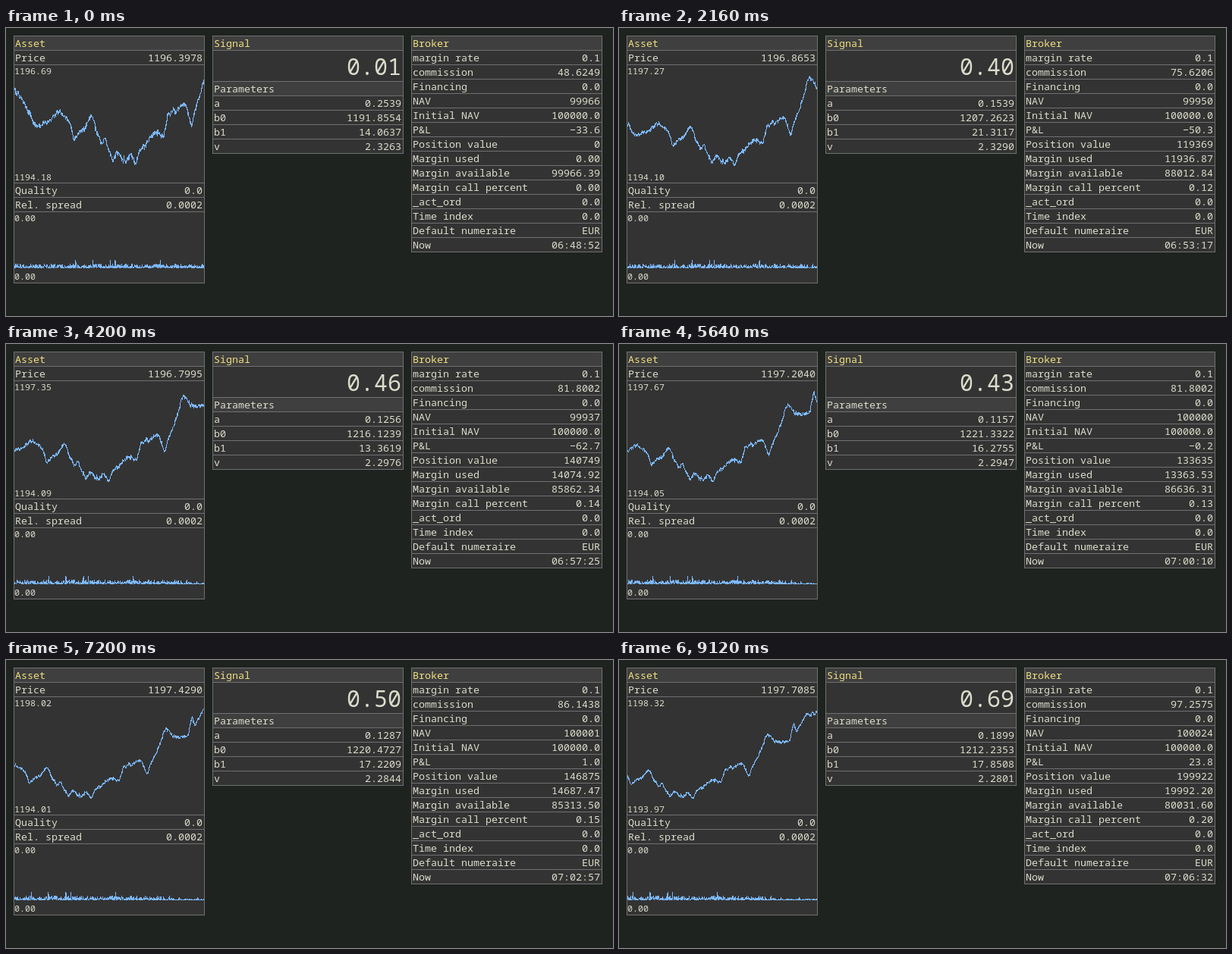
Write an HTML page that moves like this. It is 800x380 px and loops after 9.24 s.

```html
<!DOCTYPE html>
<html lang="en">
<head>
<meta charset="utf-8">
<title>Trading monitor</title>
<style>
  html, body { margin: 0; width: 100%; height: 100%; overflow: hidden; background: #1e2320; }
  svg { display: block; width: 800px; height: 380px; }
  text { font: 13.333px "Noto Sans Mono", "DejaVu Sans Mono", monospace; fill: #dcdccc; }
  .title { fill: #f0df80; }
  .right { text-anchor: end; }
  .small { font-size: 11.667px; }
  .big { font-size: 30px; }
  .panel { fill: #333; }
  .bar { fill: #3f3f3f; }
  .frame { fill: none; stroke: #707070; }
  .curve { fill: none; stroke: #7cb8ff; shape-rendering: crispEdges; stroke-linejoin: bevel; }
</style>
</head>
<body>
<svg id="stage" viewBox="0 0 800 380"></svg>
<script>
const LOOP = 9240, STEP = 120, ROW = 19, TOP = 10, WIDTH = 252;
const stage = document.getElementById('stage');

function add(tag, attrs, content) {
  const el = document.createElementNS('http://www.w3.org/2000/svg', tag);
  for (const name in attrs) el.setAttribute(name, attrs[name]);
  if (content !== undefined) el.textContent = content;
  return stage.appendChild(el);
}

// Panels are stacks of rows: [label, value or $field, height, kind]
const fields = {};
function panel(x, rows) {
  const height = rows.reduce((sum, r) => sum + (r[2] || ROW), 0);
  add('rect', { x, y: TOP, width: WIDTH, height, class: 'panel' });
  let y = TOP, lines = '';
  for (const [label, value, h = ROW, kind = ''] of rows) {
    if (kind === 'title' || kind === 'head')
      add('rect', { x, y, width: WIDTH, height: h, class: 'bar' });
    if (label) add('text', { x: x + 2, y: y + 15, class: kind }, label);
    if (value !== undefined) {
      const baseline = kind === 'big' ? 33 : 15;
      const el = add('text', { x: x + 249, y: y + baseline, class: 'right ' + kind }, value);
      if (value[0] === '$') fields[value.slice(1)] = el;
    }
    y += h;
    if (y < TOP + height) lines += `M${x} ${y + 0.5}h${WIDTH}`;
  }
  add('path', { d: lines, class: 'frame' });
  add('rect', { x: x + 0.5, y: TOP + 0.5, width: WIDTH - 1, height, class: 'frame' });
}

panel(10, [
  ['Asset', undefined, ROW, 'title'],
  ['Price', '$price'],
  ['', undefined, 156],
  ['Quality', '0.0'],
  ['Rel. spread', '0.0002'],
  ['', undefined, 94]
]);
panel(272, [
  ['Signal', undefined, ROW, 'title'],
  ['', '$signal', 41, 'big'],
  ['Parameters', undefined, ROW, 'head'],
  ['a', '$a'], ['b0', '$b0'], ['b1', '$b1'], ['v', '$v']
]);
panel(534, [
  ['Broker', undefined, ROW, 'title'],
  ['margin rate', '0.1'],
  ['commission', '$commission'],
  ['Financing', '0.0'],
  ['NAV', '$nav'],
  ['Initial NAV', '100000.0'],
  ['P&L', '$profit'],
  ['Position value', '$position'],
  ['Margin used', '$used'],
  ['Margin available', '$free'],
  ['Margin call percent', '$call'],
  ['_act_ord', '0.0'],
  ['Time index', '0.0'],
  ['Default numeraire', 'EUR'],
  ['Now', '$now']
]);

const priceCurve = add('path', { class: 'curve' });
const spreadCurve = add('path', { class: 'curve' });
const small = y => add('text', { x: 11, y, class: 'small' }, '0.00');
fields.high = small(61);
fields.low = small(201);
small(255);
small(332);

function noise(n) {
  const s = Math.sin(n * 12.9898 + 4.1) * 43758.5453;
  return s - Math.floor(s);
}

// Linear interpolation of ys over the rising positions xs
function lerp(xs, ys, x) {
  let i = 0;
  while (i < xs.length - 2 && x >= xs[i + 1]) i++;
  return ys[i] + (ys[i + 1] - ys[i]) * (x - xs[i]) / (xs[i + 1] - xs[i]);
}

// Readings at a few ticks; every other value follows from these
const OPEN = 24532;
const ticks = [0, 7, 18, 35, 47, 60, 76];
const readings = {
  elapsed: [0, 108, 265, 513, 678, 845, 1060],
  price: [1196.3978, 1196.9505, 1196.8653, 1196.7995, 1197.2040, 1197.4290, 1197.7085],
  high: [1196.69, 1197.01, 1197.27, 1197.35, 1197.67, 1198.02, 1198.32],
  signal: [0.01, 0.01, 0.40, 0.46, 0.43, 0.50, 0.69],
  a: [0.2539, 0.3117, 0.1539, 0.1256, 0.1157, 0.1287, 0.1899],
  b0: [1191.8554, 1187.4893, 1207.2623, 1216.1239, 1221.3322, 1220.4727, 1212.2353],
  b1: [14.0637, 15.2328, 21.3117, 13.3619, 16.2755, 17.2209, 17.8508],
  v: [2.3263, 2.3336, 2.3290, 2.2976, 2.2947, 2.2844, 2.2801],
  commission: [48.6249, 49.5572, 75.6206, 81.8002, 81.8002, 86.1438, 97.2575],
  profit: [-33.61, -33.32, -50.29, -62.74, -0.16, 0.97, 23.80],
  used: [0, 306.04, 11936.87, 14074.92, 13363.53, 14687.47, 19992.20]
};

function readAt(tick) {
  const r = {};
  for (const name in readings) r[name] = lerp(ticks, readings[name], tick);
  r.low = 1194.178 - 0.129 * (r.high - 1196.69);
  r.nav = 100000 + r.profit;
  r.position = r.used * 10;
  r.free = r.nav - r.used;
  r.call = r.used / r.nav;
  return r;
}

const digits = {
  price: 4, a: 4, b0: 4, b1: 4, v: 4, commission: 4,
  high: 2, low: 2, signal: 2, used: 2, free: 2, call: 2,
  profit: 1, nav: 0, position: 0
};

// Turning points of the price: [x, cents above 1194]
const turns = [
  [11, 218], [24, 188], [41, 135], [60, 152], [68, 172], [84, 152], [90, 110], [104, 132],
  [113, 160], [125, 102], [131, 108], [140, 66], [146, 80], [158, 62], [164, 78], [171, 57],
  [176, 84], [197, 128], [208, 116], [214, 165], [237, 184], [244, 138], [250, 175],
  [258, 222], [269, 293], [282, 262], [299, 275], [304, 335], [308, 306], [320, 363], [336, 373]
];
const turnX = turns.map(t => t[0]), turnY = turns.map(t => t[1]);

const LEFT = 11, SPAN = 250, GRAIN = 0.35;

function priceAt(i) {
  const x = LEFT + i * GRAIN;
  const wander = noise(Math.floor(x / 2.5) + 300) - 0.5;
  const jitter = noise(i) - 0.5;
  return 1194 + (lerp(turnX, turnY, x) + wander * 9 + jitter * 11) / 100;
}

// Small bursts with rare spikes, dying down late
function spreadAt(i) {
  const n = noise(i + 900);
  const level = LEFT + i * GRAIN > 280 ? 0.3 : 1;
  return (n > 0.994 ? 10 : 5.5 * n * n * n) * level;
}

function trace(shift, yOf) {
  const last = Math.floor((shift + SPAN) / GRAIN);
  let d = '';
  for (let i = Math.ceil(shift / GRAIN); i <= last; i++) {
    const x = LEFT + i * GRAIN - shift;
    d += (d ? 'L' : 'M') + x.toFixed(1) + ' ' + yOf(i).toFixed(1);
  }
  return d;
}

function clockText(seconds) {
  const s = Math.round(seconds);
  return [s / 3600, s / 60 % 60, s % 60]
    .map(n => String(Math.floor(n)).padStart(2, '0')).join(':');
}

let shown = -1;
function draw(time) {
  const tick = Math.floor(time % LOOP / STEP);
  if (tick === shown) return;
  shown = tick;

  const r = readAt(tick);
  for (const name in digits)
    fields[name].textContent = r[name].toFixed(digits[name]).replace('-', '\u2212');
  fields.now.textContent = clockText(OPEN + r.elapsed);

  // One hour spans the whole chart
  const shift = r.elapsed * SPAN / 3600;
  const scale = 155 / (r.high - r.low);
  priceCurve.setAttribute('d', trace(shift, i => 49 + (r.high - priceAt(i)) * scale));
  spreadCurve.setAttribute('d', trace(shift, i => 316.5 - spreadAt(i)));
}

const begin = performance.now();
function loop() {
  draw(performance.now() - begin);
  requestAnimationFrame(loop);
}
loop();
</script>
</body>
</html>
```
